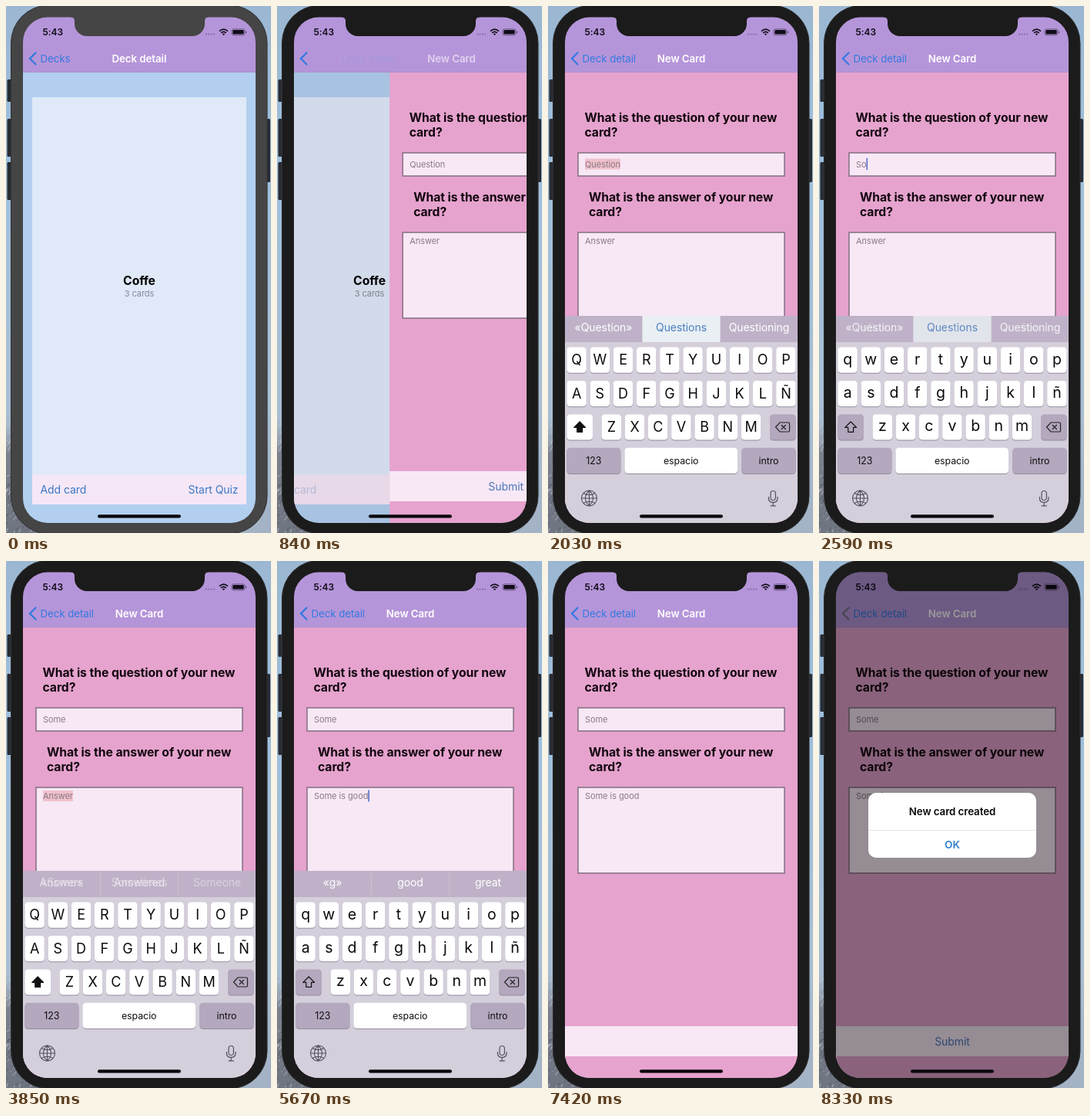
Write an HTML page that moves like this. It is 344 by 682 pixels and loops after 8.4 s.

```html
<!DOCTYPE html>
<html lang="en">
<head>
<meta charset="utf-8">
<title>New card</title>
<style>
html, body { margin: 0; width: 100%; height: 100%; overflow: hidden; background: #a5c0d9; }
svg { display: block; width: 344px; height: 682px; }
text { font-family: Inter, "Liberation Sans", sans-serif; letter-spacing: -.005em; white-space: pre; }
</style>
</head>
<body>
<svg id="stage" viewBox="0 0 344 682"></svg>
<script>
const LOOP = 8400;
const BLUE = '#3579e0', LINK = '#3b78c4', PALE = '#f8e8f6', INK = '#8b7886', KEY_GREY = '#b3a8be';

const text = (x, y, str, size, fill, weight = 400, anchor = 'start', more = '') =>
  `<text x="${x}" y="${y}" font-size="${size}" fill="${fill}" font-weight="${weight}" text-anchor="${anchor}" ${more}>${str}</text>`;
const rect = (x, y, w, h, fill, r = 0, more = '') =>
  `<rect x="${x}" y="${y}" width="${w}" height="${h}" rx="${r}" fill="${fill}" ${more}/>`;
const path = (d, stroke, width, fill = 'none', more = '') =>
  `<path d="${d}" stroke="${stroke}" stroke-width="${width}" fill="${fill}" ${more}/>`;
const group = (id, body, more = '') => `<g id="${id}" ${more}>${body}</g>`;

// Desktop behind the phone, with streaky rock at the lower left
function wallpaper() {
  let seed = 7, streaks = '';
  const rnd = () => (seed = seed * 16807 % 2147483647) / 2147483647;
  for (let i = 0; i < 170; i++) {
    const x = rnd() * 36, y = 545 + rnd() * 137;
    streaks += path(`M${x} ${y}l${1 + rnd() * 4} ${-2 - rnd() * 5}`, rnd() < .5 ? '#c3c6d0' : '#4d525e', .8);
  }
  return rect(0, 0, 344, 682, 'url(#sky)') + rect(0, 535, 50, 147, 'url(#rock)') + streaks;
}

function statusBar() {
  let dots = '';
  for (let i = 0; i < 4; i++) dots += `<circle cx="${260 + i * 3.4}" cy="36.6" r="1" fill="#7d68a0"/>`;
  return text(47.5, 38, '5:43', 12, '#100c18', 600) + dots +
    path('M277 32.6q5.5-4.8 11 0M279.2 34.8q3.3-2.8 6.6 0', '#100c18', 1.7) +
    path('M280.8 36.2q1.7-1.2 3.4 0l-1.7 1.9z', 'none', 0, '#100c18') +
    rect(293, 29.8, 17, 8, 'none', 2.4, 'stroke="#5b4a72" stroke-width=".8"') +
    rect(294.3, 31.1, 14.4, 5.4, '#100c18', 1.3) + rect(311, 32.4, 1.2, 2.8, '#5b4a72', .6);
}

const deckScreen = () => rect(22, 86, 302, 583, '#b2cff0') +
  rect(34, 118, 278, 489, '#dfe9f7') + rect(34, 607, 278, 38, '#f6e7f6') +
  text(173, 361, 'Coffe', 15.75, '#000', 700, 'middle') +
  text(173, 375.8, '3 cards', 11, '#83899a', 400, 'middle') +
  text(44.5, 631, 'Add card', 14, LINK, 400, 'start', 'id="add"') +
  text(301.5, 631, 'Start Quiz', 14, LINK, 400, 'end');

function field(id, y, h, baseline) {
  return rect(39, y + 1, 268, h - 2, PALE, 0, 'stroke="#8f788c" stroke-width="1.7"') +
    rect(48, baseline - 11, 0, 14, '#efc1cb', 0, `id="${id}Sel"`) +
    text(48, baseline, '', 11, INK, 400, 'start', `id="${id}"`) +
    rect(0, baseline - 11.5, 1.5, 15, '#4a66c8', 0, `id="${id}Caret"`);
}

const heading = (x, y, noun) =>
  text(x, y, `What is the ${noun} of your new`, 15.75, '#12060e', 700) + text(x, y + 19, 'card?', 15.75, '#12060e', 700);

const cardScreen = () => rect(22, 86, 302, 583, '#e6a3ce') +
  heading(47.5, 150, 'question') + field('q', 189, 32, 208.5) +
  heading(53, 253, 'answer') + field('a', 292, 113, 308) +
  rect(22, 602, 302, 39, PALE) + text(173, 626.5, 'Submit', 14, '#4a76b8', 400, 'middle', 'id="submit"');

const header = () => rect(22, 14, 302, 72, '#b595d9') + rect(22, 85.5, 302, .6, '#a48bc4') +
  path('M38.5 60.5L31 68l7.5 7.5', BLUE, 2.3, 'none', 'id="chevron" stroke-linecap="round"') +
  text(44.5, 72.8, 'Decks', 13.3, BLUE, 400, 'start', 'id="decks"') +
  text(44.5, 72.8, 'Deck detail', 13.3, BLUE, 400, 'start', 'id="back"') +
  text(173, 72.8, 'Deck detail', 13.3, '#fff', 600, 'middle', 'id="title"') +
  text(173, 72.8, 'New Card', 13.3, '#fff', 600, 'middle', 'id="newTitle"') + statusBar();

const key = (x, y, w, fill = '#fff', id = '') =>
  rect(x, y + 1, w, 33.2, '#938b9e', 4.2) + rect(x, y, w, 33.2, fill, 4.2, id && `id="${id}"`);

function letters(row, x0, y) {
  return [...row].map((c, i) => key(x0 + i * 30.2, y, 25.4) +
    text(x0 + i * 30.2 + 12.7, y + 22, c, 19.5, '#0a0a0c', 400, 'middle', 'class="letter"')).join('');
}

function keyboard() {
  const slots = id => group(id, rect(122.5, 401, 101, 34, '#e9eff3', 0, 'class="hot"') +
    [72, 173, 274].map(x => text(x, 421.3, '', 14, '#fff', 400, 'middle')).join(''));
  return rect(22, 401, 302, 268, '#d4cfdb') + rect(22, 401, 302, 34, '#bfb2c8') +
    rect(122, 403, .7, 30, '#d0c5d6') + rect(223, 403, .7, 30, '#d0c5d6') +
    slots('oldHints') + slots('hints') +
    letters('qwertyuiop', 24.4, 441.6) + letters('asdfghjklñ', 24.4, 485) + letters('zxcvbnm', 69.6, 528.4) +
    key(24.4, 528.4, 33.6, KEY_GREY, 'shift') +
    path('M41.2 538l-7.4 7.4h4v6h6.8v-6h4z', '#111', 1.2, 'none', 'id="arrow" stroke-linejoin="round"') +
    key(288, 528.4, 33.6, KEY_GREY) +
    path('M295.5 545l5.5-6h11q1.5 0 1.5 1.5v9q0 1.5-1.5 1.5h-11zM302.8 542l6 6m0-6l-6 6', '#222', 1.2) +
    key(24.4, 571.8, 70, KEY_GREY) + text(59.4, 593, '123', 12.4, '#111', 400, 'middle') +
    key(99.4, 571.8, 146.6) + text(172.7, 592.8, 'espacio', 12.4, '#111', 400, 'middle') +
    key(251.4, 571.8, 70.2, KEY_GREY) + text(286.5, 592.8, 'intro', 12.4, '#111', 400, 'middle') +
    path('M43.5 637a10 10 0 1 0 20 0a10 10 0 1 0-20 0h20M53.5 627v20M53.5 627q-10 10 0 20q10-10 0-20M46 630.5q7.5 4.5 15 0M46 643.5q7.5-4.5 15 0', '#555260', 1.1) +
    rect(289, 627.5, 6.4, 12, 'none', 3.2, 'stroke="#555260" stroke-width="1.2"') +
    path('M286.4 635v2q0 5.4 5.8 5.4t5.8-5.4v-2M292.2 642.4v4.4M288.6 646.8h7.2', '#555260', 1.2);
}

const alertBox = () => rect(64, 300, 218, 84, '#fff', 10) + rect(64, 348, 218, .7, '#dadada') +
  text(173, 329, 'New card created', 13.3, '#080808', 600, 'middle') +
  text(173, 372, 'OK', 13.6, '#2f7dcc', 600, 'middle');

const phone = () =>
  [[95, 29], [146, 49], [202, 49]].map(([y, h]) => rect(1.5, y, 8, h, '#292c33', 1.5)).join('') +
  rect(335, 146, 8, 82, '#292c33', 1.5) +
  rect(6.5, -1, 332.5, 684, '#1b1b1b', 49, 'class="bezel" stroke="#303236" stroke-width="1"');

const $ = id => document.getElementById(id);
const set = (id, props) => Object.entries(props).forEach(([k, v]) => $(id).setAttribute(k, v));

$('stage').innerHTML = `<defs>
  <linearGradient id="sky" x2="0" y2="1"><stop stop-color="#9bb7d1"/><stop offset=".3" stop-color="#9fc0dd"/>
    <stop offset=".75" stop-color="#a9bfd3"/><stop offset="1" stop-color="#a3b2c4"/></linearGradient>
  <linearGradient id="rock" x2="0" y2="1"><stop stop-color="#9aa5b2" stop-opacity="0"/><stop offset=".3" stop-color="#7b818e"/>
    <stop offset="1" stop-color="#6e7480"/></linearGradient>
  <clipPath id="glass">${rect(22, 14.6, 302, 654.4, '#000', 32)}</clipPath></defs>` +
  wallpaper() + phone() +
  group('screen', group('deck', deckScreen()) + rect(22, 86, 302, 583, '#000', 0, 'id="dim"') +
    group('card', cardScreen()) + header() + group('keys', keyboard()) +
    rect(22, 14, 302, 655, '#000', 0, 'id="shade"') + group('alert', alertBox()) +
    rect(119, 658.3, 108, 4.2, '#0a080c', 2.1), 'clip-path="url(#glass)"') +
  path('M84 13v1.6q5 0 5 5v3.4a16 16 0 0 0 16 16h137a16 16 0 0 0 16-16v-3.4q0-5 5-5v-1.6z', 'none', 0, '#1b1b1b', 'class="bezel"');

const clamp = v => Math.max(0, Math.min(1, v));
const ramp = (t, from, to) => clamp((t - from) / (to - from));
const easeOut = u => 1 - (1 - u) ** 3;
const latest = (list, t) => list.findLastIndex(item => item[0] <= t);

const question = [[0, 'Question'], [2400, 'S'], [2540, 'So'], [2730, 'Som'], [2900, 'Some']];
const answer = [[0, 'Answer'], [4130, 'S'], [4270, 'So'], [4410, 'Som'], [4550, 'Some'], [4690, 'Some '],
  [4830, 'Some i'], [4970, 'Some is'], [5110, 'Some is '], [5320, 'Some is g'], [5600, 'Some is good']];
const hints = [[0, '', '', ''], [1500, '«Question»', 'Questions', 'Questioning'], [2550, '«So»', 'Do', 'Son'],
  [2800, '«Som»', 'Some', 'Somos'], [3050, '«Some»', 'Sometimes', 'Someone'], [3710, 'Answers', 'Answered', ''],
  [4160, '«S»', 'So', 'Some'], [4570, '«Some»', 'Sometimes', 'Someone'], [4820, 'of', 'people', 'things'],
  [5000, 'is', 'isn’t', 'issue'], [5140, 'a', 'the', 'not'], [5340, '«g»', 'good', 'great'], [5720, 'for', 'and', 'to']];
const HOT = 1;

function drawField(id, steps, t, focus, blur) {
  const [since, value] = steps[latest(steps, t)];
  const focused = t >= focus && t < blur, selected = focused && since === 0;
  $(id).textContent = value;
  const width = $(id).getComputedTextLength();
  const lit = focused && !selected && (t - since) % 1000 < 550;
  set(id + 'Sel', { width: selected ? width : 0 });
  set(id + 'Caret', { x: 48 + width, opacity: +lit });
}

function drawHints(id, index, opacity) {
  const g = $(id);
  g.setAttribute('opacity', opacity);
  const hot = index === HOT;
  g.querySelector('.hot').setAttribute('opacity', +hot);
  g.querySelectorAll('text').forEach((el, i) => {
    el.textContent = hints[Math.max(0, index)][i + 1];
    el.setAttribute('fill', hot && i === 1 ? '#4a7fc0' : '#fff');
  });
}

function render(t) {
  const grey = Math.round(69 - 42 * ramp(t, 70, 350));
  document.querySelectorAll('.bezel').forEach(el => el.setAttribute('fill', `rgb(${grey},${grey},${grey})`));

  // Push from the deck to the new card form
  const push = easeOut(ramp(t, 700, 1250));
  set('deck', { transform: `translate(${-90 * push})` });
  set('dim', { opacity: .1 * push });
  set('card', { transform: `translate(${302 * (1 - push)})` });
  set('add', { opacity: 1 - .7 * ramp(t, 560, 640) });
  set('decks', { opacity: clamp(1 - 2 * push), transform: `translate(${-60 * push})` });
  set('title', { opacity: clamp(1 - 1.6 * push), transform: `translate(${-94 * push})` });
  set('back', { opacity: clamp(2 * push - 1), transform: `translate(${94 * (1 - push)})` });
  set('newTitle', { opacity: push, transform: `translate(${130 * (1 - push)})` });

  drawField('q', question, t, 1500, 3710);
  drawField('a', answer, t, 3710, 6520);

  // Keyboard
  const up = easeOut(ramp(t, 1520, 1860)) - easeOut(ramp(t, 6520, 6860));
  set('keys', { transform: `translate(0 ${270 * (1 - up)})` });
  const caps = t < 2400 || t >= 3780 && t < 4130;
  document.querySelectorAll('.letter').forEach(el => {
    el.textContent = caps ? el.textContent.toUpperCase() : el.textContent.toLowerCase();
    el.setAttribute('font-size', caps ? 18 : 19.5);
    el.setAttribute('dy', caps ? .8 : 0);
  });
  set('shift', { fill: caps ? '#fff' : KEY_GREY });
  set('arrow', { fill: caps ? '#111' : 'none' });
  const now = latest(hints, t), mix = ramp(t, hints[now][0], hints[now][0] + 240);
  drawHints('oldHints', now - 1, 1 - mix);
  drawHints('hints', now, mix);

  // Submit and confirmation
  set('submit', { opacity: 1 - ramp(t, 7240, 7380) + ramp(t, 7490, 7620) });
  const shown = easeOut(ramp(t, 7620, 7900)), scale = 1.18 - .18 * shown;
  set('shade', { opacity: .4 * shown });
  set('chevron', { stroke: shown > .5 ? '#77718a' : BLUE });
  set('alert', { opacity: shown, transform: `translate(173 342) scale(${scale}) translate(-173 -342)` });
}

const start = performance.now();
function tick() {
  render((performance.now() - start) % LOOP);
  requestAnimationFrame(tick);
}
tick();
</script>
</body>
</html>
```
